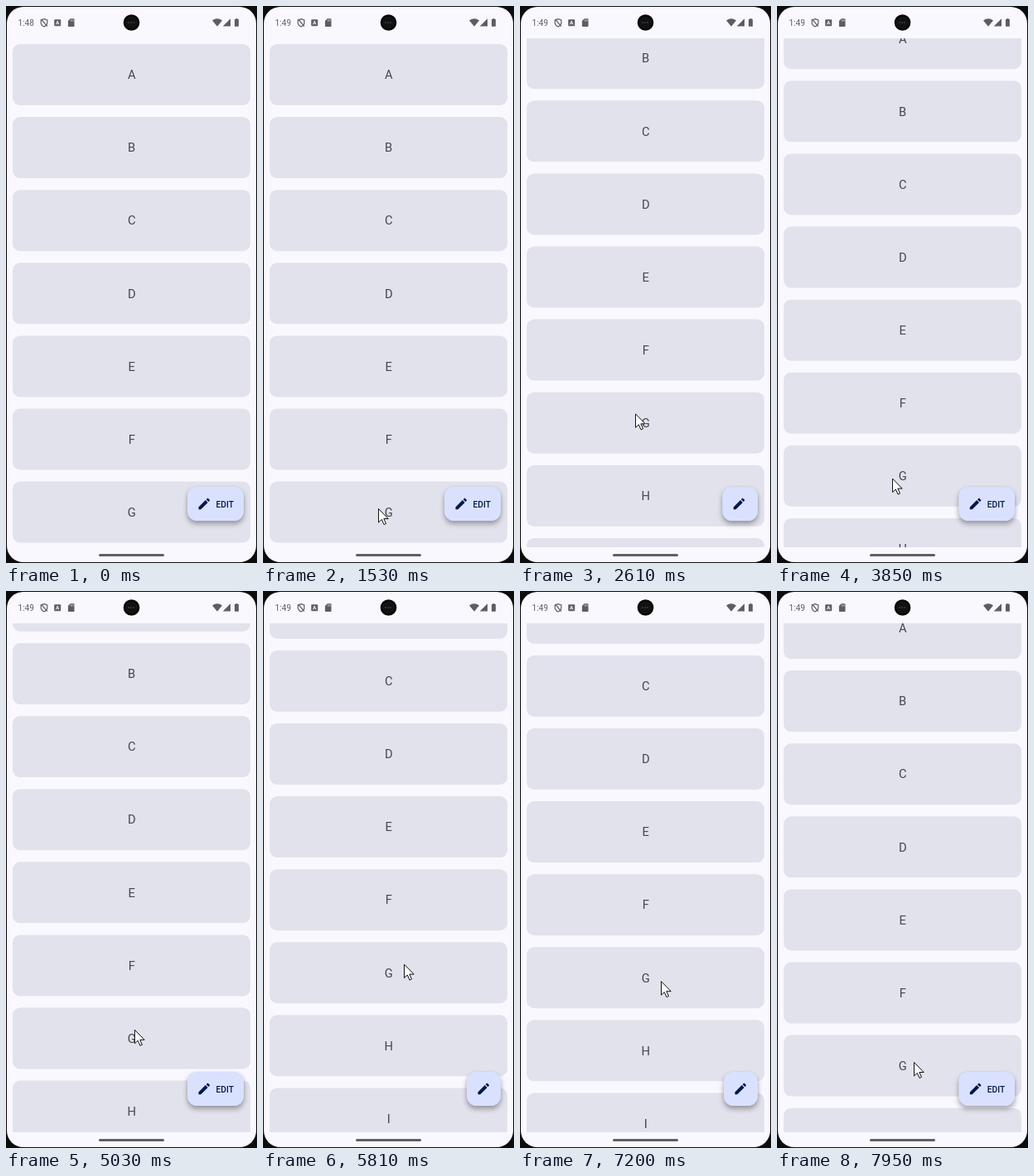
Recreate the animation shown at these times as an HTML page. Size 303 px wide and 673 px high, loop 8000 ms.

```html
<!DOCTYPE html>
<html lang="en">
<head>
<meta charset="utf-8">
<style>
  html, body { margin: 0; width: 100%; height: 100%; overflow: hidden; background: #0c0c0d; }
  svg { display: block; font-family: Roboto, sans-serif; }
  #fab { filter: drop-shadow(0 4px 3px rgba(0, 0, 0, .28)) drop-shadow(0 1px 2px rgba(0, 0, 0, .1)); }
</style>
</head>
<body>
<svg width="303" height="673" viewBox="0 0 303 673">
  <clipPath id="view"><rect x="1" y="39" width="301" height="615"/></clipPath>
  <rect x="1" y="1" width="301" height="671" rx="20" fill="#faf8ff"/>

  <g clip-path="url(#view)"><g id="list" text-anchor="middle" font-size="14.7"></g></g>

  <!-- status bar -->
  <g fill="#5d5d63">
    <text id="clock" x="14.5" y="24" font-size="10.1">1:48</text>
    <path d="M46 15.6l3.8 1.4v3c0 2.3-1.5 4-3.8 5-2.3-1-3.8-2.7-3.8-5v-3zM42.500 16l7.300 8.600" fill="none" stroke="#5d5d63" stroke-width="1.2"/>
    <rect x="58.2" y="16.2" width="8" height="8" rx="1"/>
    <path d="M60.4 22.4l1.8-4.4 1.8 4.4M61 21h2.4" fill="none" stroke="#faf8ff" stroke-width=".9"/>
    <path d="M77.700 15.300h4a.8.8 0 0 1 .8.8v8.200a.8.8 0 0 1-.8.8h-6a.8.8 0 0 1-.8-.8v-6.200z"/>
    <path d="M78.200 16.500v2M79.700 16.500v2M81.200 16.500v2" stroke="#faf8ff" stroke-width=".6"/>
    <path d="M249 17.500q6-4.600 12 0l-6 7.200zM271 15.200v9.300h-9.300z"/>
    <path d="M277.500 15h2v1h1.400v8.700h-4.900v-8.700h1.500z"/>
  </g>
  <circle cx="151.5" cy="20" r="9.8" fill="#080808"/>
  <circle cx="151.5" cy="20" r="6.5" fill="#111" stroke="#1a1a1b"/>
  <path d="M147 20h9" stroke="#303033" stroke-width="2" stroke-dasharray="2 1"/>

  <rect x="112" y="662" width="79" height="3" rx="1.5" fill="#606065"/>

  <g id="fab" fill="#001849">
    <rect id="face" y="581" height="41" rx="11.5" fill="#dae1ff"/>
    <path id="pencil" d="M3 17.250V21h3.750L17.810 9.940l-3.750-3.750zM20.710 7.040a1 1 0 0 0 0-1.410l-2.340-2.340a1 1 0 0 0-1.410 0l-1.830 1.830 3.750 3.750z"/>
    <text id="label" y="605.5" font-size="10.2" font-weight="500">EDIT</text>
  </g>

  <path id="cursor" d="M.5.5V17l3.800-3.600 2.700 6.100 2.500-1.100-2.700-5.900h5.400z" fill="#fff" stroke="#111" stroke-linejoin="round"/>
</svg>
<script>
const LOOP = 8000, PITCH = 88.1;
const FIRST_HIDDEN = 81;  // scroll at which card A has left the view
const TOUCH_LAG = 60;     // the list trails the pointer by this many ms
const FAB_MS = 400;

const $ = id => document.getElementById(id);
const set = (id, attrs) => {
  for (const name in attrs) $(id).setAttribute(name, attrs[name]);
};
const clamp = v => Math.min(1, Math.max(0, v));
const span = (t, from, to) => clamp((t - from) / (to - from));
const mix = (a, b, p) => a + (b - a) * p;

// Each drag starts at the scroll where the one before ended
let reached = 0;
const drags = [[1650, 2790, 128], [3160, 4210, 0], [4610, 5030, 71], [5030, 6290, 199], [6816, 7950, 38]]
  .map(([start, end, to]) => {
    const from = reached;
    reached = to;
    return { start, end, from, to };
  });

const scrollAt = t => drags.reduce((s, d) => s + (d.to - d.from) * span(t, d.start, d.end), 0);

// The button toggles whenever a drag carries card A out of or into view
const toggles = drags
  .filter(d => (d.from < FIRST_HIDDEN) !== (d.to < FIRST_HIDDEN))
  .map(d => mix(d.start, d.end, span(FIRST_HIDDEN, d.from, d.to)));

$('list').innerHTML = [...'ABCDEFGHIJ'].map((c, i) =>
  `<g transform="translate(0 ${i * PITCH})">
    <rect x="8" y="46" width="287" height="74" rx="9" fill="#e1e2ec"/>
    <text x="151.7" y="88.3" fill="#44464f">${c}</text></g>`).join('');

function drawFab(t) {
  const past = toggles.filter(time => time <= t);
  const open = past.length % 2 === 0;
  const age = past.length ? t - past.at(-1) : LOOP;
  const p = 1 - (1 - clamp(age / FAB_MS)) ** 3;
  const left = mix(219, 246, open ? 1 - p : p);
  set('face', { x: left, width: 287 - left });
  set('pencil', { transform: `translate(${left + 11.2} 592.4) scale(.755)` });
  set('label', { x: left + 34.5, opacity: open ? span(age, 80, 240) : 1 - span(age, 0, 100) });
}

function drawCursor(t) {
  const arrive = span(t, 810, 1530);
  const x = mix(254, 139, arrive) + 31 * span(t, 4210, 5810) - 5 * span(t, 7200, 7950);
  const y = mix(618, 607, arrive ** 2) - scrollAt(t + TOUCH_LAG);
  set('cursor', { transform: `translate(${x} ${y})`, visibility: t < 810 ? 'hidden' : 'visible' });
}

function draw(t) {
  $('clock').textContent = t < 810 ? '1:48' : '1:49';
  set('list', { transform: `translate(0 ${-scrollAt(t)})` });
  drawFab(t);
  drawCursor(t);
}

const start = performance.now();
function tick() {
  draw((performance.now() - start) % LOOP);
  requestAnimationFrame(tick);
}
tick();
</script>
</body>
</html>
```
